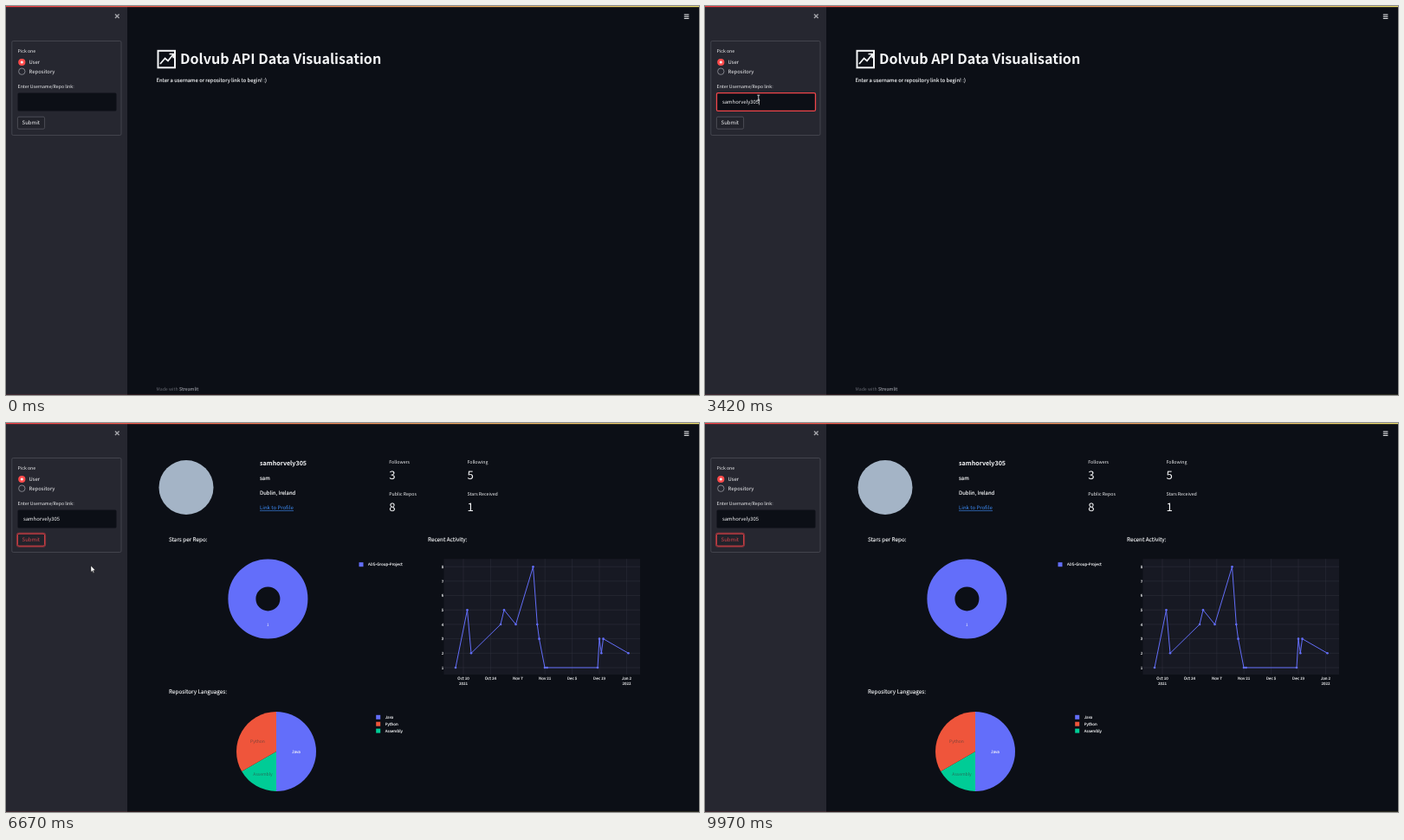
An HTML page that plays this animation: 800 by 450 pixels, repeating every 10 s.

```html
<!DOCTYPE html>
<html lang="en">
<head>
<meta charset="utf-8">
<title>API Data Visualisation</title>
<style>
html, body { margin: 0; width: 100%; height: 100%; overflow: hidden; background: #0c0f16; }
svg { display: block; width: 800px; height: 450px; }
text {
  font-family: "Noto Sans CJK JP", "Noto Sans CJK SC", "Noto Sans CJK", "Open Sans", sans-serif;
  text-rendering: geometricPrecision; white-space: pre;
}
.semi { font-weight: 500; stroke: currentColor; stroke-width: .13; }
.bold { font-weight: 700; }
.mid { text-anchor: middle; }
.line { fill: none; }
</style>
</head>
<body>
<svg id="stage" viewBox="0 0 800 450"></svg>
<script>
const USER = 'samhorvely305', NICK = 'sam', LOOP = 10000;
const BLUE = '#636efa', RED = '#ef553b', GREEN = '#00cc96', ACCENT = '#ff4b4b', WHITE = '#f4f5f7';

const text = (x, y, size, str, fill = WHITE, cls = '', id = '') =>
  `<text id="${id}" class="${cls}" x="${x}" y="${y}" font-size="${size}" fill="${fill}" color="${fill}">${str}</text>`;
const rect = (x, y, w, h, fill, more = '') =>
  `<rect x="${x}" y="${y}" width="${w}" height="${h}" fill="${fill}" ${more}/>`;
const circle = (x, y, r, fill, more = '') => `<circle cx="${x}" cy="${y}" r="${r}" fill="${fill}" ${more}/>`;
const path = (d, stroke, width = 1, more = '') =>
  `<path class="line" d="${d}" stroke="${stroke}" stroke-width="${width}" ${more}/>`;
const group = (id, ...parts) => `<g id="${id}">${parts.join('')}</g>`;

// Pie slice; angles are degrees clockwise from the top.
function slice(cx, cy, r, from, to, fill) {
  const point = a => `${cx + r * Math.sin(a * Math.PI / 180)} ${cy - r * Math.cos(a * Math.PI / 180)}`;
  return `<path d="M${cx} ${cy}L${point(from)}A${r} ${r} 0 0 1 ${point(to)}Z" fill="${fill}"/>`;
}

const legend = (x, y, label, fill) =>
  rect(x, y - 2.5, 5, 5, fill) + text(x + 10.5, y + 1.7, 4.5, label, WHITE, 'semi');

const metric = (x, y, label, value) =>
  text(x, y, 5.25, label) + text(x, y + 17.8, 13.2, value);

function lineChart() {
  const yOf = v => 283 - (v - 1) * 16.68;
  const dates = ['Oct 10', 'Oct 24', 'Nov 7', 'Nov 21', 'Dec 5', 'Dec 19', 'Jan 2'];
  const points = [[519, 1], [532.5, 5], [537, 2], [571, 4], [575, 5], [588.5, 4], [608.5, 8], [613.3, 4],
    [615.5, 3], [622, 1], [624.5, 1], [683, 1], [685, 3], [687.3, 2], [689.5, 3], [718.5, 2]]
    .map(([x, v]) => [x, yOf(v)]);
  let out = rect(505.5, 157.3, 226.5, 133.7, '#171923');
  for (let v = 1; v <= 8; v++)
    out += path(`M505.5 ${yOf(v)}H732`, '#2c2e39', .6) +
      text(504, yOf(v) + 1.7, 4.5, v, WHITE, 'mid semi');
  dates.forEach((label, i) => {
    const x = 528 + i * 31.4;
    out += path(`M${x} 157.3V291`, '#2c2e39', .6) + text(x, 296.8, 4.5, label, WHITE, 'mid semi');
  });
  out += text(528, 303, 4.5, '2021', WHITE, 'mid semi') + text(716.4, 303, 4.5, '2022', WHITE, 'mid semi');
  return out + path('M' + points.join('L'), BLUE, 1) + points.map(p => circle(...p, 1.3, BLUE)).join('');
}

function modeBar() {
  const dim = '#454852', y = 123;
  return rect(656, y - 2, 6, 4.5, dim) + circle(659, y, 1.2, '#0c0f16') +
    circle(671.5, y - .5, 2, 'none', 'stroke="#858890"') + path(`M673 ${y + 1}l2 2`, '#858890', 1.2) +
    path(`M679.5 ${y}h6M682.5 ${y - 3}v6`, dim, 1.1) +
    rect(689.5, y - 2.5, 5.5, 5.5, 'none', `stroke="${dim}" stroke-dasharray="1 .6"`) +
    path(`M701 ${y + 3}c2-2-2-2-1-4s6-2 6 0-3 2-4 2`, dim, .9) +
    [715.5, 725.5].map(x => rect(x - 3, y - 3, 6, 6, dim)).join('') +
    path(`M713.5 ${y}h4M715.5 ${y - 2}v4M723.5 ${y}h4`, '#0c0f16', 1) +
    path(`M732.7 ${y - 2.8}l5.6 5.6M738.3 ${y - 2.8}l-5.6 5.6`, dim, 1) +
    path(`M742.5 ${y}l3-2.6 3 2.6M744 ${y}v2.5h3v-2.5`, dim, 1.1) +
    rect(756, y - 3, 6, 6, '#31567c') +
    path('M774.6 122v-2.7h2.7M774.6 119.3l5 4.6M779.6 121.2v2.7h-2.7', '#d5d6da', .9);
}

const footer = y => text(173.5, y, 5.2, 'Made with ', '#656770') +
  text(200, y, 5.2, 'Streamlit', '#8d8f97', 'semi');

const welcome = group('welcome',
  rect(175.5, 51.8, 19.5, 19.5, 'none', `stroke="${WHITE}" stroke-width="2"`),
  path('M178 67l5.6-6.5 3.4 3 6-7.5M188.5 55.5h4.7v4.7', WHITE, 1.7),
  text(201, 67.4, 16.1, 'Dolvub API Data Visualisation', WHITE, 'bold'),
  text(173.5, 88.3, 5.92, 'Enter a username or repository link to begin! :)', WHITE, 'semi'),
  footer(444.5));

const report = group('report',
  circle(208, 74.5, 31.5, '#a4b4c6'),
  text(293, 48.5, 7.15, USER, WHITE, 'bold'),
  text(293, 66, 6, NICK, WHITE, 'semi'),
  text(293, 83.3, 6, 'Dublin, Ireland', WHITE, 'semi'),
  text(293, 100.4, 6, 'Link to Profile', '#3d8bf5'),
  path('M293 101.5h39', '#3d8bf5', .6),
  metric(442.3, 47, 'Followers', 3), metric(532.4, 47, 'Following', 5),
  metric(442.3, 84.4, 'Public Repos', 8), metric(532.4, 84.4, 'Stars Received', 1),
  text(188, 136.6, 6.35, 'Stars per Repo:', WHITE, 'semi'),
  text(487, 136.6, 6.35, 'Recent Activity:', WHITE, 'semi'),
  text(188, 313.1, 6.35, 'Repository Languages:', WHITE, 'semi'),
  circle(302.4, 203.4, 30, 'none', `stroke="${BLUE}" stroke-width="32"`),
  text(302.4, 235.4, 4.6, 1, WHITE, 'mid'),
  legend(407.5, 163.7, 'ADS-Group-Project', BLUE),
  slice(312, 380, 46, 0, 180, BLUE), slice(312, 380, 46, 180, 240, GREEN), slice(312, 380, 46, 240, 360, RED),
  text(335, 382, 4.6, 'Java', WHITE, 'mid semi'),
  text(290.5, 369.6, 5, 'Python', '#7d4339', 'mid'),
  text(296.5, 408.4, 5, 'Assembly', '#24705c', 'mid'),
  legend(427.2, 340.3, 'Java', BLUE), legend(427.2, 348.2, 'Python', RED), legend(427.2, 356.1, 'Assembly', GREEN),
  lineChart(), group('modeBar', modeBar()), footer(539));

const sidebar = group('sidebar',
  rect(0, 0, 140, 450, '#262730'),
  path('M126 9.5l4.6 4.6M130.6 9.5l-4.6 4.6', '#a3a4a9', 1.4),
  rect(6.8, 40.5, 126.2, 109, 'none', 'rx="1.5" stroke="#4b4c55" stroke-width=".8"'),
  text(13.6, 53.6, 5.2, 'Pick one'),
  circle(18.3, 65, 4.1, ACCENT), circle(18.3, 65, 1.5, WHITE),
  circle(18.3, 75.7, 3.7, '#262730', 'stroke="#8b8c93" stroke-width=".9"'),
  text(26.6, 67.2, 5.92, 'User'), text(26.6, 77.9, 5.92, 'Repository'),
  text(13.6, 94.6, 5.2, 'Enter Username/Repo link:'),
  rect(13.5, 100.6, 114, 20.8, '#0c0f16', 'id="field" rx="1.5" stroke-width="1.3"'),
  text(20, 113.2, 5.92, '', WHITE, '', 'typed'),
  rect(0, 107.4, .6, 7, WHITE, 'id="caret"'),
  rect(12.4, 127.2, 33.2, 16, 'none', 'id="glow" rx="2.2" stroke="#8e343c" stroke-width="1"'),
  rect(13.4, 128.2, 31.2, 14, '#22232b', 'id="button" rx="1.6" stroke-width=".9"'),
  text(18.6, 137.4, 6.05, 'Submit', WHITE, '', 'submit'));

const running = group('running',
  circle(704.7, 13.6, 2.5, 'none', 'stroke="#9a9ca3" stroke-width=".7"'),
  circle(711, 13.6, 2.3, 'none', 'stroke="#9a9ca3" stroke-width=".7"'),
  path('M707.5 14.5l.4-2-2.2-1.6 2.6-2 1.6 2h1.6', '#9a9ca3', .8), circle(709.4, 7.8, .9, '#9a9ca3'),
  text(716, 14.6, 5.2, 'RUNNING...', '#8a8c94'),
  rect(747.5, 5.6, 26.5, 12.8, '#12151d', 'rx="1.5" stroke="#3c3f48" stroke-width=".8"'),
  text(755, 14, 5.2, 'Stop', WHITE, 'semi'));

document.getElementById('stage').innerHTML =
  `<defs><linearGradient id="rainbow"><stop stop-color="#f23f45"/><stop offset="1" stop-color="#eee070"/></linearGradient></defs>` +
  rect(0, 0, 800, 450, '#0c0f16') + welcome + report + running + sidebar +
  path('M782.8 10h5.6M782.8 12.2h5.6M782.8 14.4h5.6', WHITE, 1) +
  rect(798.4, 0, 1.6, 372, '#565960', 'id="thumb" rx=".6"') +
  rect(0, 0, 800, 1.2, 'url(#rainbow)') + rect(0, 449.2, 800, .8, 'url(#rainbow)', 'opacity=".18"') +
  group('pointer',
    '<path id="arrow" d="M0 0v7.4l1.7-1.5 1.1 2.5 1.1-.5-1.1-2.4h2.3z" fill="#fff" stroke="#000" stroke-width=".4"/>',
    path('M-1.5-3h3M0-3v6M-1.5 3h3', '#e8e8ea', .8, 'id="beam"'));

const $ = id => document.getElementById(id);
const show = (id, on) => $(id).setAttribute('visibility', on ? 'visible' : 'hidden');
const set = (id, name, value) => $(id).setAttribute(name, value);
const clamp = u => Math.min(1, Math.max(0, u));
const easeOut = u => 1 - (1 - clamp(u)) ** 3;

const FOCUS = 1300, CLICK = 4200, RUN = 4300, DONE = 6300;
const route = [[450, 800, 230], [1150, 63, 105], [3350, 63, 105], [3950, 31, 136], [4250, 31, 136], [4600, 87, 160],
  [5300, 87, 160], [5800, 98, 165], [6750, 98, 165], [7180, 490, 270.5], [8350, 490, 270.5], [8900, 806, 270]];

function pointerAt(t) {
  const i = route.findIndex(stop => stop[0] > t);
  if (i < 1) return null;
  const [t0, x0, y0] = route[i - 1], [t1, x1, y1] = route[i];
  const u = (t - t0) / (t1 - t0), k = u * u * (3 - 2 * u);
  return [x0 + (x1 - x0) * k, y0 + (y1 - y0) * k];
}

function draw(t) {
  const done = t >= DONE, focused = t >= FOCUS && t < CLICK, clicked = t >= CLICK;
  const scroll = 94.5 * (easeOut((t - 7240) / 260) - easeOut((t - 7660) / 470));
  show('welcome', !done);
  show('report', done);
  show('running', t >= RUN && !done);
  show('modeBar', t > 7130 && t < 7650 || t > 8150 && t < 8750);
  set('report', 'transform', `translate(0 ${-scroll})`);
  show('thumb', t > 7240 && t < 8600);
  set('thumb', 'y', scroll * 450 / 544.5);

  $('typed').textContent = USER.slice(0, Math.max(0, Math.floor((t - 1500) / 125)));
  set('field', 'stroke', focused ? '#f0464a' : 'none');
  set('caret', 'x', 20.3 + $('typed').getComputedTextLength());
  show('caret', focused && (t < 3300 || t % 1000 < 500));

  const spot = pointerAt(t);
  const over = (x, y, w, h) => spot && spot[0] > x && spot[0] < x + w && spot[1] > y && spot[1] < y + h;
  const hot = clicked || over(13, 128, 32, 14);
  const inField = over(13, 100, 115, 21);
  set('button', 'stroke', hot ? '#f0464a' : '#51525b');
  set('submit', 'fill', hot ? '#d8424a' : WHITE);
  show('glow', clicked);

  show('arrow', spot && !inField);
  show('beam', inField);
  if (spot) set('pointer', 'transform', `translate(${spot})`);
}

function frame() {
  draw(performance.now() % LOOP);
  requestAnimationFrame(frame);
}
frame();
</script>
</body>
</html>
```
